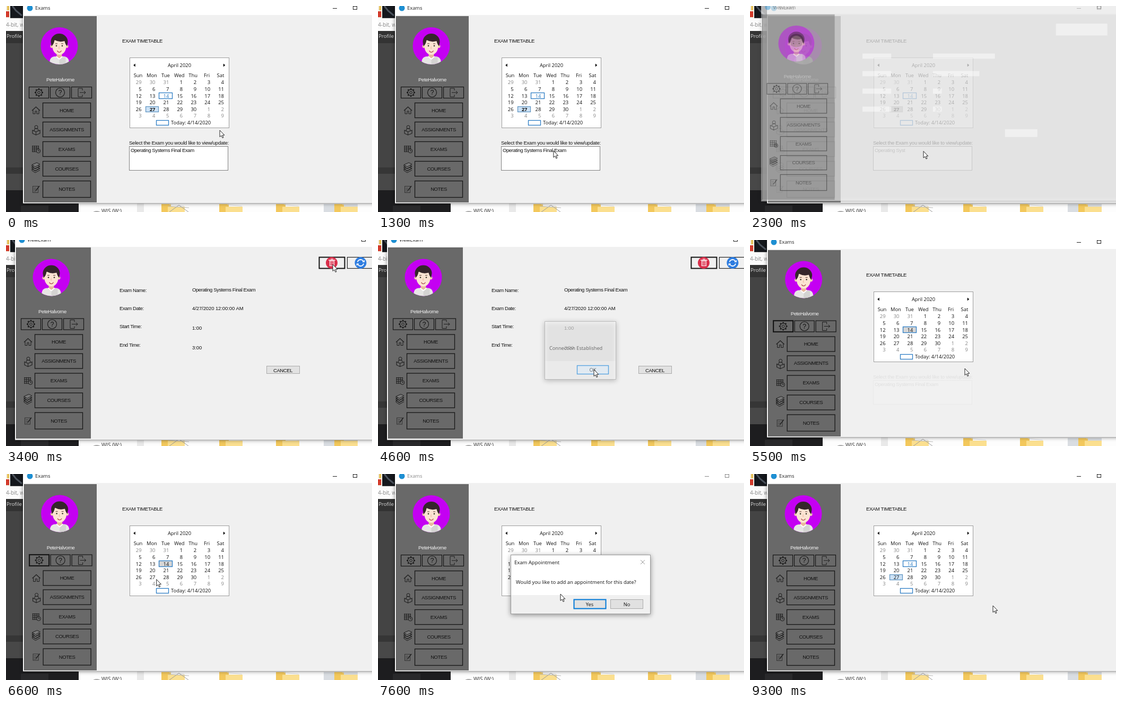
These frames come from a looping animation (690 px wide and 388 px high, 9400 ms). An HTML page with a canvas:

```html
<!DOCTYPE html>
<html lang="en">
<head>
<meta charset="utf-8">
<title>Exam planner</title>
<style>
html, body { margin: 0; width: 100%; height: 100%; overflow: hidden; background: #444; }
canvas { display: block; width: 690px; height: 388px; }
</style>
</head>
<body>
<canvas id="stage" width="690" height="388"></canvas>
<script>
const c = document.getElementById('stage').getContext('2d');
const LOOP = 9400, STEP = 100;
const SANS = '"Liberation Sans", Arial, sans-serif';
const UI = '"Open Sans", "Noto Sans", sans-serif';
const USER = 'PeteHalvorne';
const BLUE = '#2b7cc4', PANEL = '#f0f0f0';

// Interpolates [time, ...values] keys, easing in and out between them.
function track(keys, t) {
  let i = keys.findIndex(k => k[0] > t);
  if (i < 0) return keys[keys.length - 1].slice(1);
  if (i === 0) return keys[0].slice(1);
  const a = keys[i - 1], b = keys[i];
  const u = (t - a[0]) / (b[0] - a[0]), e = u * u * (3 - 2 * u);
  return a.slice(1).map((v, n) => v + (b[n + 1] - v) * e);
}

function fill(x, y, w, h, color) {
  c.fillStyle = color;
  c.fillRect(x, y, w, h);
}

function box(x, y, w, h, stroke, width = 1, color) {
  if (color) fill(x, y, w, h, color);
  c.strokeStyle = stroke;
  c.lineWidth = width;
  c.strokeRect(x + .5, y + .5, w - 1, h - 1);
}

function disc(x, y, r, color) {
  oval(x, y, r, r, color);
}

function oval(x, y, rx, ry, color) {
  c.fillStyle = color;
  c.beginPath();
  c.ellipse(x, y, rx, ry, 0, 0, 7);
  c.fill();
}

function line(points, color = '#1c1c1c', width = 1, close = false, color2) {
  c.beginPath();
  points.forEach(([x, y], i) => i ? c.lineTo(x, y) : c.moveTo(x, y));
  if (close) c.closePath();
  if (color2) { c.fillStyle = color2; c.fill(); }
  c.strokeStyle = color;
  c.lineWidth = width;
  c.stroke();
}

function arc(x, y, r, from, to, color = '#1c1c1c', width = 1) {
  c.beginPath();
  c.arc(x, y, r, from, to);
  c.strokeStyle = color;
  c.lineWidth = width;
  c.stroke();
}

// y is the middle of the capital letters.
function text(s, x, y, { color = '#111', size = 9.5, font = SANS, align = 'left', gap = -.4, weight = '' } = {}) {
  c.font = `${weight} ${size}px ${font}`;
  c.letterSpacing = gap + 'px';
  c.textAlign = align;
  c.fillStyle = color;
  c.fillText(s, x, y + size * .36);
}

function uiText(s, x, y, opts) {
  text(s, x, y, { font: UI, size: 9.4, gap: 0, ...opts });
}

function layer(alpha, draw) {
  if (alpha <= 0) return;
  c.save();
  c.globalAlpha *= Math.min(1, alpha);
  draw();
  c.restore();
}

function folder(x) {
  fill(x, 373, 18, 15, '#f3c85c');
  fill(x + 12, 378, 32, 10, '#fbdf8f');
  line([[x + 15, 374], [x + 43, 377]], '#ddd');
}

function desktop() {
  fill(0, 0, 690, 388, '#444');
  fill(0, 0, 8, 24, '#f4f1e8');
  fill(0, 10, 6, 11, '#d33b2c');
  fill(2, 0, 4, 8, '#e7c25a');
  fill(8, 0, 26, 22, '#15181d');
  line([[12, 0], [19, 9], [30, 18]], '#4c535d', 3);
  fill(0, 23, 40, 24, '#fbfbfb');
  uiText('4-bit, w', 0, 35, { color: '#888', size: 10 });
  fill(0, 47, 40, 23, '#333');
  uiText('Profile', 1, 57, { color: '#ddd', size: 9.6 });
  fill(0, 304, 40, 12, '#363636');
  fill(0, 316, 40, 31, '#484848');
  fill(0, 347, 137, 41, '#1d1d1f');
  fill(28, 376, 52, 12, '#29292b');
  fill(137, 368, 553, 20, '#fdfdfd');
  fill(247, 370, 13, 18, '#e9e9e9');
  oval(171, 389, 7, 3, '#aaa');
  uiText('WIS (W:)', 180, 386, { color: '#333', size: 10 });
  fill(599, 373, 64, 15, '#d9dde2');
  [293, 402, 509, 619].forEach(folder);
  line([[308, 388], [326, 375], [344, 388]], '#999');
  line([[306, 377], [345, 380]], '#bbb');
}

function frame(left, bottom, top) {
  c.save();
  c.shadowColor = 'rgba(0,0,0,.45)';
  c.shadowBlur = 7;
  fill(left, -20, 700, bottom + 20, '#f7f7f7');
  c.restore();
  fill(left + 2, top, 690, bottom - top - 2, PANEL);
  fill(left, bottom - 1, 690, 1, '#aaa');
  fill(left, -20, 700, top + 20, '#fff');
}

function avatar(x, y) {
  c.save();
  c.beginPath();
  c.arc(x, y, 35, 0, 7);
  c.clip();
  fill(x - 36, y - 36, 72, 72, '#c400f2');
  c.fillStyle = '#e6e6e4';
  c.beginPath();
  c.roundRect(x - 18, y + 20, 36, 24, 9);
  c.fill();
  fill(x, y + 21, 12, 20, '#d4d4d2');
  fill(x - 5, y + 12, 10, 11, '#e9b99c');
  line([[x - 6, y + 20], [x, y + 25], [x + 6, y + 20]], '#fff', 2);
  oval(x, y - 8, 16, 15, '#35262b');
  disc(x - 14, y + 1, 3, '#f3cdb4');
  disc(x + 14, y + 1, 3, '#f3cdb4');
  oval(x, y + 1, 13, 16, '#fce3d2');
  c.fillStyle = '#35262b';
  c.beginPath();
  c.moveTo(x - 15, y + 1);
  c.quadraticCurveTo(x - 16, y - 18, x, y - 19);
  c.quadraticCurveTo(x + 16, y - 18, x + 15, y + 1);
  c.quadraticCurveTo(x + 11, y - 3, x + 10, y - 9);
  c.quadraticCurveTo(x, y - 6, x - 9, y - 11);
  c.quadraticCurveTo(x - 10, y - 3, x - 15, y + 1);
  c.fill();
  for (const s of [-1, 1]) {
    disc(x + s * 5.5, y, 1.3, '#332');
    line([[x + s * 3.5, y - 4], [x + s * 7.5, y - 4]], '#5a4038');
  }
  line([[x, y + 1], [x - 1, y + 5], [x + 1, y + 5]], '#e2b196', .8);
  arc(x, y + 8, 4, .3, 2.84, '#a33d3d', 1.2);
  c.restore();
}

function gear(x, y) {
  for (let i = 0; i < 8; i++) {
    const a = i * Math.PI / 4, dx = Math.cos(a), dy = Math.sin(a);
    line([[x + dx * 5.5, y + dy * 5.5], [x + dx * 8, y + dy * 8]], '#1c1c1c', 2.4);
  }
  arc(x, y, 5.8, 0, 7, '#1c1c1c', 1.2);
  arc(x, y, 2.4, 0, 7);
}

function menuIcons() {
  line([[49, 197], [56.5, 190], [64, 197]], '#1c1c1c', 1.2);
  line([[51, 196], [51, 203], [55, 203], [55, 198], [58, 198], [58, 203], [62, 203], [62, 196]]);

  arc(57, 228, 3, 0, 7);
  line([[50, 234], [56.5, 237], [64, 234], [64, 240], [56.5, 243], [50, 240]], '#1c1c1c', 1.1, true);
  line([[56.5, 237], [56.5, 243]]);
  line([[53, 235], [54, 231], [60, 231], [61, 235]]);

  for (let i = 0; i < 4; i++) {
    line([[49, 264 + i * 3.5], [62, 264 + i * 3.5]]);
    line([[50 + i * 3.8, 263], [50 + i * 3.8, 275]]);
  }
  disc(61, 273, 3.8, '#696969');
  arc(61, 273, 3.8, 0, 7);
  line([[61, 270.5], [61, 273], [63, 273]]);

  for (let i = 0; i < 3; i++) {
    const y = 310 - i * 4;
    line([[49, y - 3], [58, y - 7], [64, y - 4], [55, y + 1]], '#1c1c1c', 1, true, '#777');
    line([[49, y - 3], [49, y], [55, y + 4], [64, y - 1]]);
  }

  box(50, 339, 11, 13, '#333');
  for (let i = 0; i < 3; i++) line([[52, 343 + i * 3], [57, 343 + i * 3]], '#333', .8);
  line([[56, 348], [63, 339]], '#222', 1.6);
}

function sidebar(dx, dy, focusGear) {
  c.save();
  c.translate(dx, dy);
  avatar(100.5, 75);
  text(USER, 102.5, 139, { color: '#f2f2f2', align: 'center' });
  box(43, 152, 38, 22, '#161616', focusGear ? 2.2 : 1.2);
  box(83, 152, 38, 22, '#161616', 1.2);
  box(123, 152, 39, 22, '#161616', 1.2);
  gear(62, 163);
  arc(102, 163, 8.5, 0, 7, '#1c1c1c', 1.2);
  text('?', 102, 163, { size: 12, align: 'center', gap: 0 });
  line([[144, 159], [144, 155], [136, 155], [136, 171], [144, 171], [144, 167]]);
  line([[139, 163], [150, 163]]);
  line([[147, 160], [150, 163], [147, 166]]);
  ['HOME', 'ASSIGNMENTS', 'EXAMS', 'COURSES', 'NOTES'].forEach((name, i) => {
    const y = 182 + i * 36.75 | 0, h = i === 4 ? 32 : 29;
    box(69, y, 91, h, '#161616', 1.3);
    text(name, 114.5, y + h / 2, { align: 'center' });
  });
  menuIcons();
  c.restore();
}

function calendar({ pick, bold, today }) {
  box(233, 97, 188, 133, '#9c9c9c', 1, '#fff');
  uiText('April 2020', 327, 112, { align: 'center' });
  line([[243.5, 109], [240.5, 111.5], [243.5, 114]], '#111', .6, true, '#111');
  line([[410, 109], [413, 111.5], [410, 114]], '#111', .6, true, '#111');
  'Sun Mon Tue Wed Thu Fri Sat'.split(' ').forEach((d, i) =>
    uiText(d, 249 + i * 25.9, 131, { align: 'center' }));
  box(288, 163, 26, 12, BLUE, 1.3, today ? '#d6d6d6' : '#fff');
  if (pick) box(263, 189, 25, 11, pick === 'grey' ? '#bbb' : '#5b92bf', 1.2, pick === 'grey' ? '#ccc' : '#cce2f6');
  for (let n = 0; n < 42; n++) {
    const day = n - 2, inMonth = day > 0 && day < 31;
    const label = day < 1 ? day + 31 : day > 30 ? day - 30 : day;
    const color = !inMonth ? '#858585' : day === 14 && !today ? BLUE : '#111';
    uiText(label, 255.5 + n % 7 * 25.9, 144 + Math.floor(n / 7) * 12.6,
      { color, align: 'right', weight: day === 27 && bold ? 'bold' : '' });
  }
  box(283, 215, 24, 10, BLUE, 1.3);
  uiText('Today: 4/14/2020', 311, 220);
}

function examList(busy) {
  text('Select the Exam you would like to view/update:', 232, 257.5, { gap: -.22 });
  box(232, 264, 187, 46, '#808080', 1, '#fff');
  text(busy ? 'Operating Syst' : 'Operating Systems Final Exam', 235, 272, { color: busy ? '#777' : '#111' });
}

function examsWindow({ list = 0, busy, inactive, focusGear, ...cal }) {
  frame(32, 372, 17);
  fill(34, 19, 137, 351, '#696969');
  line([[34.5, 19], [34.5, 370]], '#4a4a4a');
  disc(45, 4, 5.5, '#1e8fd2');
  const ink = inactive ? '#888' : '#222';
  uiText('Exams', 55, 4, { color: ink });
  line([[616, 4.5], [624, 4.5]], ink);
  box(654, 0, 8, 7, ink);
  sidebar(focusGear ? .6 : 0, focusGear ? -.5 : 0, focusGear);
  text('EXAM TIMETABLE', 219, 66);
  calendar(cal);
  layer(list, () => examList(busy));
}

function viewWindow(blank) {
  frame(17, 377, 13);
  fill(19, 14, 141, 360, '#696969');
  line([[19.5, 14], [19.5, 374]], '#4a4a4a');
  disc(30, 0, 5.5, '#1e8fd2');
  uiText('ViewExam', 40, 0);
  box(670, -4, 8, 7, '#222');
  sidebar(-15, -4.5);
  const rows = [
    ['Exam Name:', 95, 'Operating Systems Final Exam', 94, -.42],
    ['Exam Date:', 129, '4/27/2020 12:00:00 AM', 129, -.1],
    ['Start Time:', 163, '1:00', 166, -.1],
    ['End Time:', 198, '3:00', 203, -.1]
  ];
  if (blank) {
    for (const [, y, value] of rows) {
      fill(214, y - 5, 56, 10, '#fff');
      fill(351, y - 5, value.length * 4.3, 10, '#fff');
    }
    fill(590, 32, 100, 23, '#fff');
    fill(491, 237, 63, 15, '#fff');
    return;
  }
  for (const [label, y, value, vy, gap] of rows) {
    text(label, 214, y);
    text(value, 351, vy, { gap });
  }
  box(590, 32, 49, 22, '#111', 2);
  box(643, 32, 52, 22, '#222', 1.2);
  disc(614, 43, 11, '#d92f4b');
  box(610, 39, 9, 10, '#fff', 1.2);
  line([[608, 38], [621, 38]], '#fff', 1.3);
  line([[612, 36], [617, 36]], '#fff', 1.2);
  for (const x of [613, 616]) line([[x, 41], [x, 47]], '#fff', .9);
  disc(668.5, 43, 11, '#2f7de0');
  arc(668.5, 43, 6, 3.4, 5.9, '#fff', 1.8);
  arc(668.5, 43, 6, .26, 2.76, '#fff', 1.8);
  line([[672, 41], [675.5, 41], [675.5, 38]], '#fff', 1.4);
  line([[665, 45], [661.5, 45], [661.5, 48]], '#fff', 1.4);
  box(491, 237, 63, 15, '#aaa', 1, '#e2e2e2');
  text('CANCEL', 522, 245.5, { align: 'center' });
}

function panel(x, y, w, h, foot) {
  c.save();
  c.shadowColor = 'rgba(0,0,0,.4)';
  c.shadowBlur = 9;
  c.shadowOffsetY = 2;
  fill(x, y, w, h, '#fff');
  c.restore();
  fill(x, foot, w, y + h - foot, PANEL);
  box(x, y, w, h, '#999');
}

function connectedDialog() {
  panel(314, 153, 135, 110, 228);
  uiText('Connection Established', 323, 204, { size: 9.2 });
  box(375, 236, 60, 17, '#0078d7', 1.4, '#dcecf9');
  uiText('OK', 405, 245, { align: 'center' });
}

function askDialog(hover) {
  panel(250, 152, 264, 112, 228);
  uiText('Exam Appointment', 257, 167, { size: 9.5 });
  line([[495, 162], [503, 170]], '#999');
  line([[503, 162], [495, 170]], '#999');
  uiText('Would you like to add an appointment for this date?', 260, 204);
  box(369, 236, 61, 18, '#aaa', 1, '#e1e1e1');
  box(438, 236, 62, 18, '#aaa', 1, '#e1e1e1');
  layer(1 - hover, () => box(369, 236, 61, 18, '#0078d7', 2, '#e1e1e1'));
  layer(hover, () => box(438, 236, 62, 18, '#0078d7', 1.4, '#dcecf9'));
  uiText('Yes', 399, 246, { align: 'center' });
  uiText('No', 469, 246, { align: 'center' });
}

const pointer = [
  [0, 403, 234], [100, 403, 234], [1000, 338, 271], [1500, 327, 273.5], [2400, 327, 273.5],
  [3100, 616, 46], [3700, 616, 46], [4400, 407, 244], [5100, 407, 244], [5300, 405, 242],
  [6100, 405, 242], [6700, 274, 195], [7200, 274, 195], [7600, 344, 226], [8100, 458, 248]
];

function cursor(t) {
  const [x, y] = track(pointer, t);
  const shape = [[0, 0], [0, 12.5], [3, 10], [5, 14.5], [7, 13.6], [5, 9.3], [8.8, 9.2]];
  line(shape.map(([a, b]) => [x + a, y + b]), '#222', 1, true, '#fff');
}

function draw(t) {
  c.globalAlpha = 1;
  desktop();
  const opening = track([[2200, 0.15], [2300, .45], [2400, .8], [2500, 1]], t)[0];
  if (t < 2500) examsWindow({ list: 1, busy: t >= 2200, pick: t < 2200 ? 'blue' : 'grey', bold: true });
  if (t >= 2200 && t < 5400) {
    const scale = track([[2200, .94], [2300, .97], [2500, 1]], t)[0];
    layer(opening, () => {
      c.translate(147, 74);
      c.scale(scale, scale);
      c.translate(-147, -74);
      viewWindow(t < 2400);
    });
    layer(track([[3900, 0], [4000, .6], [4100, 1], [4500, 1], [4600, .6], [4700, .2], [4800, 0]], t)[0], connectedDialog);
  }
  if (t >= 5200) {
    const picked = t >= 6700;
    const shown = track([[5200, .4], [5300, .8], [5400, 1]], t)[0];
    const asking = t >= 6900 && t < 8800;
    layer(shown, () => examsWindow({
      list: track([[5200, .7], [5300, .4], [5400, .2], [5500, .07], [5600, 0]], t)[0],
      pick: picked && 'blue', today: !picked, focusGear: !picked, inactive: asking
    }));
    const ask = track([[6800, 0], [6900, .4], [7000, .85], [7100, 1], [8700, 1], [8800, .6], [8900, .2], [9000, 0]], t)[0];
    layer(ask, () => askDialog(track([[8100, 0], [8500, 1]], t)[0]));
  }
  cursor(t);
}

function tick(now) {
  draw(Math.floor(now % LOOP / STEP) * STEP);
  requestAnimationFrame(tick);
}
requestAnimationFrame(tick);
</script>
</body>
</html>
```
